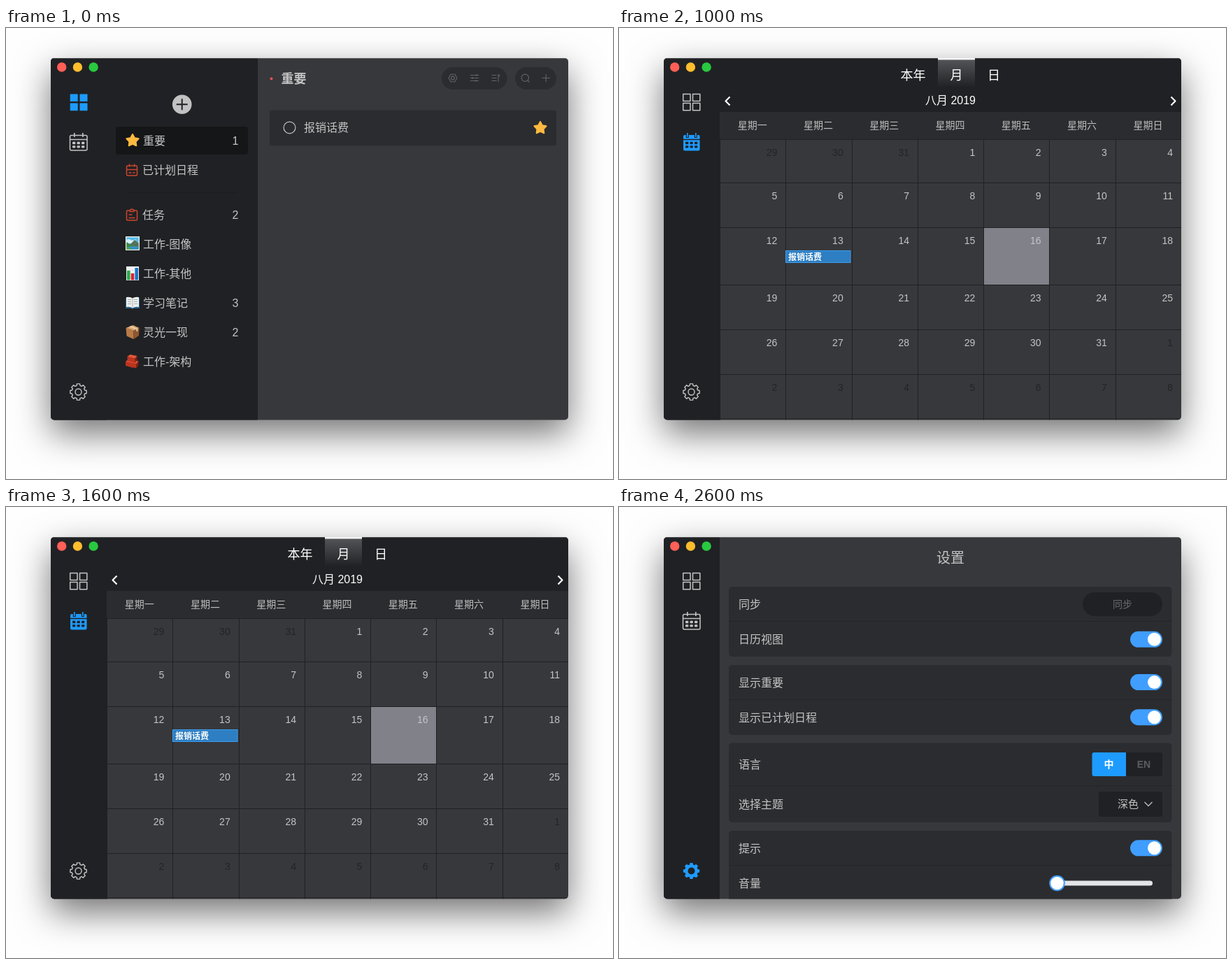
An HTML page with a canvas for the animation above (3000 ms loop, 868 px wide and 645 px high).

```html
<!DOCTYPE html>
<html lang="zh-CN">
<head>
<meta charset="utf-8">
<title>待办</title>
<style>
html, body { margin: 0; width: 100%; height: 100%; overflow: hidden; background: #fff; }
canvas { display: block; }
</style>
</head>
<body>
<canvas id="stage" width="868" height="645"></canvas>
<script>
const ctx = document.getElementById('stage').getContext('2d');
const DARK = '#202124', PANEL = '#37383b', CARD = '#2b2c2f', TEXT = '#c4c4c5',
      DIM = '#626366', BLUE = '#1e9bff', SWITCH = '#409eff', RED = '#cb452f', GOLD = '#ffb940';

function box(x, y, w, h, fill, r = 0) {
  ctx.fillStyle = fill;
  ctx.beginPath();
  ctx.roundRect(x, y, w, h, r);
  ctx.fill();
}

function line(d, color, width = 1.5) {
  ctx.strokeStyle = color;
  ctx.lineWidth = width;
  ctx.stroke(new Path2D(d));
}

function shape(d, fill) {
  ctx.fillStyle = fill;
  ctx.fill(new Path2D(d), 'evenodd');
}

const ring = (x, y, r) => `M${x - r} ${y}a${r} ${r} 0 1 0 ${2 * r} 0a${r} ${r} 0 1 0 ${-2 * r} 0z`;
const disc = (x, y, r, fill) => shape(ring(x, y, r), fill);

// y is the vertical middle of the glyphs
function label(text, x, y, size = 16, color = TEXT, align = 'left', weight = 400) {
  ctx.font = `${weight} ${size}px "Liberation Sans", "Noto Sans CJK SC", "Noto Sans CJK", sans-serif`;
  ctx.textAlign = align;
  ctx.fillStyle = color;
  ctx.fillText(text, x, y + size * 0.37);
}

// closed outline through [angle in degrees, radius] points
const polar = (x, y, points) => 'M' + points.map(([deg, r]) => {
  const a = deg * Math.PI / 180;
  return `${x + r * Math.sin(a)} ${y - r * Math.cos(a)}`;
}).join('L') + 'z';

function star(x, y) {
  const d = polar(x, y, Array.from({ length: 10 }, (_, i) => [i * 36, i % 2 ? 4.8 : 9]));
  shape(d, GOLD);
  line(d, GOLD, 2);
}

function gridIcon(active) {
  for (const x of [91.7, 105.5]) for (const y of [94.4, 107.6]) {
    if (active) box(x, y, 11, 10.6, BLUE, 0.5);
    else line(`M${x} ${y}h10.3v10.2h-10.3z`, TEXT);
  }
}

function calendarIcon(active) {
  const color = active ? BLUE : TEXT;
  if (active) box(92, 153, 23.5, 22.5, BLUE, 2);
  else line('M93.5 153.5h20.5q2 0 2 2v17.5q0 2-2 2h-20.5q-2 0-2-2v-17.5q0-2 2-2z', color);
  line('M92 159.5h24', active ? DARK : color, 1.3);
  if (active) line('M97.8 151v6M109.8 151v6', DARK, 4);
  line('M97.8 150v6M109.8 150v6', color, 1.6);
  for (const x of [95, 101.5, 108]) for (const y of [162.8, 168.2])
    box(x, y, 4.3, 3.4, active ? DARK : color, 1);
}

function gearIcon(active) {
  const teeth = [];
  for (let a = 0; a < 360; a += 45) teeth.push([a - 15, 9.4], [a - 10, 11.8], [a + 10, 11.8], [a + 15, 9.4]);
  const d = polar(103.5, 520.5, teeth), hole = ring(103.5, 520.5, active ? 5 : 4.5);
  if (active) shape(d + hole, BLUE);
  else line(d + hole, TEXT, 1.4);
}

function pictureEmoji() {
  box(171, 298, 20, 20, '#f4f4f0');
  box(172.3, 299.3, 17.4, 17.4, '#58bdea');
  shape('M172.3 303q3-2 6 0t7-1v6h-13z', '#d9f1fa');
  shape('M176 311l8-8 5.7 5v6h-14z', '#55735a');
  shape('M172.3 306l6 4 4 4h-10z', '#3f8b3c');
  shape('M172.3 316.7v-3q8-3 17.4-1v4z', '#3793bd');
  shape('M172.3 316.7v-4l8 4z', '#62ad3d');
}

function chartEmoji() {
  box(172, 341, 18, 20, '#f3f5f7');
  line('M172 346h18M172 351h18M172 356h18', '#ccd5da', 0.7);
  box(173, 347, 4.6, 13.5, '#2aab48');
  box(178.7, 351, 4.6, 9.5, '#d9262f');
  box(184.4, 343, 4.6, 17.5, '#1c74c9');
}

function bookEmoji() {
  shape('M171 386h20v15h-8l-2 1-2-1h-8z', '#28618f');
  shape('M172 385q6-1 9 1.5q3-2.500 9-1.500v14q-6-1-9 1.500q-3-2.500-9-1.500z', '#eef0ee');
  line('M181 386.500v13M174 388.500h5M174 391.500h5M174 394.500h5M183 388.500h5M183 391.500h5M183 394.500h5', '#9da6ab', 0.9);
}

function boxEmoji() {
  shape('M171.500 429l10-4 9 4-8 4z', '#d9a673');
  shape('M171.500 429l11 4v12l-10-4.500z', '#b77b48');
  shape('M182.500 433l8-4-.5 11-7.500 5z', '#8e572f');
  shape('M176 427.200l2.500-1 10 4v3l-2 1v-3z', '#ead1a9');
}

function bricksEmoji() {
  const brick = (x, y) => {
    shape(`M${x} ${y + 3}l4-3 10 2-3 4z`, '#e2563a');
    shape(`M${x} ${y + 3}l11 3v6l-11-3z`, '#bd3420');
    shape(`M${x + 11} ${y + 6}l3-4v6l-3 4z`, '#84200f');
  };
  brick(171, 474);
  brick(175.500, 474.500);
  brick(173.500, 467);
}

function listView() {
  box(64, 43, 296, 518, DARK);
  disc(251.7, 109.3, 13.8, '#c2c2c2');
  line('M243.700 109.300h16M251.700 101.300v16', DARK, 2);
  box(157, 141, 189, 40, '#151617', 4);
  line('M172 235.500h158', '#1b1c1e', 1);

  const rows = [['重要', 161, 1], ['已计划日程', 203], ['任务', 267, 2], ['工作-图像', 309],
    ['工作-其他', 351], ['学习笔记', 393, 3], ['灵光一现', 435.5, 2], ['工作-架构', 477.5]];
  for (const [name, y, count] of rows) {
    label(name, name == '已计划日程' || name == '任务' ? 195 : 196, y);
    if (count) label(count, 332.5, y, 16, TEXT, 'right');
  }
  star(181, 161);
  line('M174 197h12q1.500 0 1.500 1.500v11q0 1.500-1.500 1.500h-12q-1.500 0-1.500-1.500v-11q0-1.500 1.500-1.500zM172.500 202.500h15M176.500 194.500v4M183.500 194.500v4M175.500 207h4M181.500 207h3', RED, 1.5);
  line('M177 261h-3q-1.500 0-1.500 1.500v11q0 1.500 1.500 1.500h12q1.500 0 1.500-1.500v-11q0-1.500-1.500-1.500h-3M177 262.500v-2l3-1.500 3 1.500v2zM175.500 267h5M175.500 271.500h9', RED, 1.5);
  pictureEmoji();
  chartEmoji();
  bookEmoji();
  boxEmoji();
  bricksEmoji();

  disc(379.5, 72.5, 2, '#e8505b');
  label('重要', 393.5, 72.5, 18, TEXT, 'left', 700);
  box(623, 56, 93.5, 32, CARD, 16);
  box(728, 56, 59, 32, CARD, 16);
  line('M633 71.500l3-5.200h6l3 5.200-3 5.200h-6z' + ring(639, 71.5, 2.4), DIM, 1.1);
  line('M664 67.500h12M664 71.500h12M664 75.500h12M673 66v3M667 70v3M672 74v3', DIM, 1.1);
  line('M694.500 67.500h7M694.500 71.500h7M694.500 75.500h7M704 77v-10.500l2.500 2.500', DIM, 1.1);
  line(ring(742.3, 71.3, 5.2) + 'M746 75l2.500 2.500M766.500 71.500h11.500M772.200 66v11', DIM, 1.1);

  box(377, 117.5, 410, 51, CARD, 4);
  line(ring(405.5, 142.5, 8.4), TEXT, 1.2);
  label('报销话费', 426, 142.5);
  star(764, 143);
}

function calendarView() {
  box(144, 43, 660, 77, DARK);
  const glow = ctx.createLinearGradient(0, 43, 0, 85);
  glow.addColorStop(0, '#56575b');
  glow.addColorStop(1, DARK);
  box(456, 43, 53, 42, glow);
  box(456, 43, 53, 2.5, '#f2f3f3');
  label('本年', 420.5, 67.5, 18, '#fff', 'center', 500);
  label('月', 482.5, 67.5, 18, '#fff', 'center', 500);
  label('日', 536, 67.5, 18, '#fff', 'center', 500);
  label('八月 2019', 474, 103.5, 16, '#fff', 'center', 500);
  line('M158.500 98.500l-6 6 6 6M789.500 98.500l6 6-6 6', '#fff', 2.2);

  const col = 94.28, tops = [159.5, 221.5, 285.5, 367.5, 431.5, 495.5, 559];
  box(144, 120, 660, 39, '#2b2c2f');
  box(521.8, 286, 93.4, 81, '#81818a');
  [...'一二三四五六日'].forEach((day, i) => label('星期' + day, 190.7 + col * i, 139, 14, '#bcbcbd', 'center'));
  for (let i = 0; i < 7; i++) {
    line(`M${Math.round(144 + col * i) + 0.5} 159v402M144 ${tops[i]}h660`, DARK, 1);
  }
  for (let i = 0; i < 42; i++) {
    const date = i - 2, inMonth = date > 0 && date < 32;
    const shown = date < 1 ? date + 31 : date > 31 ? date - 31 : date;
    label(shown, 226.4 + col * (i % 7), tops[Math.floor(i / 7)] + 18.5, 14, inMonth ? TEXT : '#232427', 'right');
  }
  box(238, 318, 93.5, 18, '#3c9df0');
  box(239, 319, 91.5, 16, '#2d7ec2');
  label('报销话费', 242, 327.2, 12, '#fff', 'left', 700);
}

function settingsView() {
  label('设置', 474, 72.5, 20, TEXT, 'center');
  for (const [top, bottom, split] of [[114, 214, 163.5], [226, 326, 275.5], [337.5, 451, 398.5], [463, 570, 512.5]]) {
    box(157, top, 633.5, bottom - top, CARD, 5);
    line(`M157 ${split}h633.500`, '#232427', 1);
  }
  const names = ['同步', '日历视图', '显示重要', '显示已计划日程', '语言', '选择主题', '提示', '音量'];
  [139, 189, 251, 301, 368, 425, 488, 538].forEach((y, i) => label(names[i], 171, y));
  for (const y of [189.3, 250.6, 300.7, 487.8]) {
    box(731, y - 11.5, 46, 23, SWITCH, 11.5);
    disc(765.5, y, 9.5, '#fff');
  }
  box(663, 122, 114, 34, DARK, 17);
  label('同步', 720, 139, 14, '#6a6b6d', 'center');

  box(676.5, 351, 48.5, 34, BLUE, [3, 0, 0, 3]);
  box(725, 351, 52, 34, DARK, [0, 3, 3, 0]);
  label('中', 700.5, 368, 14, '#fff', 'center', 700);
  label('EN', 750.5, 368, 14, '#5c5d60', 'center', 700);
  box(686, 407, 91, 36, DARK, 4);
  label('深色', 713, 424.5, 15);
  line('M751.500 422l5.500 5.500 5.500-5.500', TEXT, 1.2);

  box(626, 534.5, 137, 7, '#e3e3e8', 3.5);
  disc(626.5, 538, 11.3, SWITCH);
  disc(626.5, 538, 9.3, '#fff');
}

const views = [listView, calendarView, settingsView];

function draw() {
  const current = Math.floor(performance.now() / 1000) % views.length;
  box(0, 0, 868, 645, '#fefefe');
  ctx.save();
  ctx.shadowColor = 'rgba(0,0,0,.55)';
  ctx.shadowBlur = 50;
  ctx.shadowOffsetY = 19;
  box(64, 43, 740, 517.5, PANEL, 5);
  ctx.restore();

  ctx.save();
  ctx.beginPath();
  ctx.roundRect(64, 43, 740, 517.5, 5);
  ctx.clip();
  box(64, 43, 80, 518, DARK);
  views[current]();
  line('M64 43.500h740', 'rgba(255,255,255,.18)', 1);
  ['#ff5f57', '#ffbd2e', '#28c940'].forEach((color, i) => disc(79.7 + 22.7 * i, 56, 6.7, color));
  gridIcon(current == 0);
  calendarIcon(current == 1);
  gearIcon(current == 2);
  ctx.restore();
  requestAnimationFrame(draw);
}

ctx.lineJoin = 'round';
draw();
</script>
</body>
</html>
```
